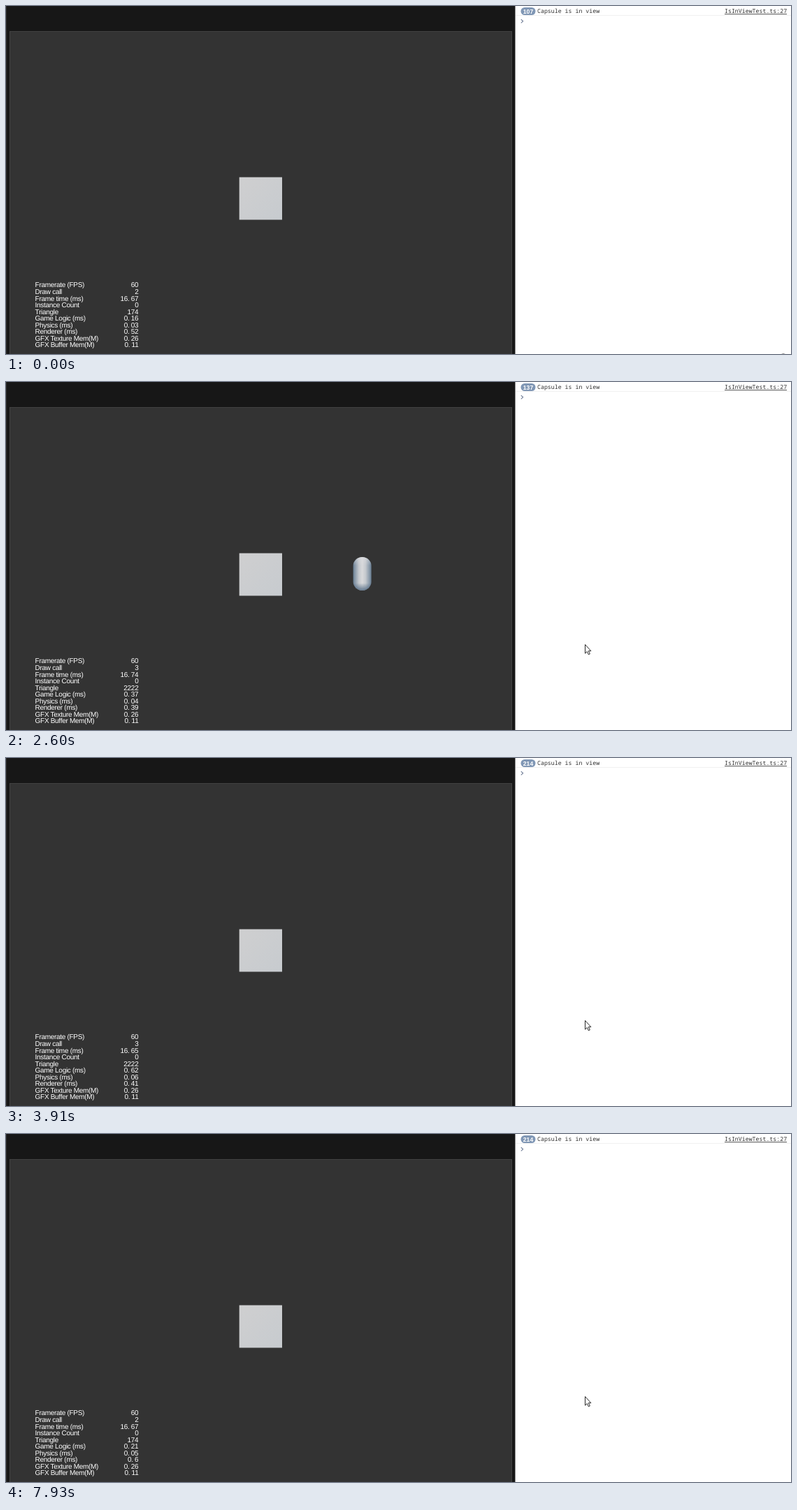
An HTML page that plays this animation: 1123 by 499 pixels, repeating every 8 s.

```html
<!DOCTYPE html>
<html lang="en">
<head>
<meta charset="utf-8">
<title>Capsule in view test</title>
<style>
  html, body { margin: 0; width: 100%; height: 100%; overflow: hidden; background: #fff; }
  svg { display: block; width: 100%; height: 100%; }
  text { white-space: pre; text-rendering: geometricPrecision; }
  .stats { font: 10px "Liberation Sans", Arial, sans-serif; letter-spacing: -.3px; fill: #fff; }
  .log { font: 8.25px "Noto Sans Mono", "DejaVu Sans Mono", monospace; fill: #303030; }
  .badge { font: bold 8.6px "Liberation Sans", Arial, sans-serif; fill: #fff; text-anchor: middle; }
</style>
</head>
<body>
<svg viewBox="0 0 1123 499">
  <defs>
    <linearGradient id="face" x1="0" y1="0" x2="1" y2="1">
      <stop offset="0" stop-color="#cfcfd0"/><stop offset="1" stop-color="#c7cbcf"/>
    </linearGradient>
    <linearGradient id="light">
      <stop offset="0" stop-color="#36536f"/><stop offset=".2" stop-color="#8b9bab"/>
      <stop offset=".36" stop-color="#c5c9ce"/><stop offset=".5" stop-color="#d8d9db"/>
      <stop offset=".64" stop-color="#c5c9ce"/><stop offset=".8" stop-color="#8b9bab"/>
      <stop offset="1" stop-color="#36536f"/>
    </linearGradient>
    <linearGradient id="shade" x1="0" y1="0" x2="0" y2="1">
      <stop offset="0" stop-color="#dcdde0" stop-opacity=".55"/>
      <stop offset=".25" stop-color="#dcdde0" stop-opacity="0"/>
      <stop offset=".78" stop-color="#3f5b78" stop-opacity="0"/>
      <stop offset="1" stop-color="#3f5b78" stop-opacity=".75"/>
    </linearGradient>
    <clipPath id="view"><rect x="5" y="37" width="719" height="462"/></clipPath>
  </defs>

  <rect width="729" height="499" fill="#171717"/>
  <rect width="1" height="499" fill="#2b2b2b"/>
  <rect x="5.5" y="36.5" width="718" height="470" fill="#333" stroke="#424242"/>
  <g clip-path="url(#view)">
    <g id="capsule">
      <rect x="-.5" y="-.5" width="1" height="1" rx=".5" ry=".26" fill="url(#light)"/>
      <rect x="-.5" y="-.5" width="1" height="1" rx=".5" ry=".26" fill="url(#shade)"/>
    </g>
  </g>
  <rect x="333.7" y="245.5" width="61.3" height="61" fill="url(#face)"/>
  <g class="stats" id="stats"></g>

  <rect x="728.5" width="395" height="499" fill="#fff"/>
  <rect x="729" y="13" width="394" height="1" fill="#f0f0f0"/>
  <rect x="736.5" y="2" width="21" height="11" rx="5.5" fill="#8097b5"/>
  <text class="badge" id="count" x="747" y="10.7"></text>
  <text class="log" x="760" y="10.3">Capsule is in view</text>
  <text class="log" x="1028" y="10.3" text-decoration="underline">IsInViewTest.ts:27</text>
  <path d="M736.8 19.2l2.8 2.6l-2.8 2.6" fill="none" stroke="#6d7b94" stroke-width="1.1"/>
  <path id="speck" d="M-3 .9Q0-.9 3 .9" fill="none" stroke="#777"/>
  <path id="cursor" d="M.5.5v12.6l2.8-2.6l2 4.3l2-.9l-2-4.2h3.6z" fill="#fff" stroke="#111" stroke-width=".9"/>
</svg>
<script>
const LOOP = 8000;
const $ = id => document.getElementById(id);
const clamp = (v, lo, hi) => Math.min(hi, Math.max(lo, v));

const labels = ['Framerate (FPS)', 'Draw call', 'Frame time (ms)', 'Instance Count', 'Triangle',
  'Game Logic (ms)', 'Physics (ms)', 'Renderer (ms)', 'GFX Texture Mem(M)', 'GFX Buffer Mem(M)'];

// start ms, frame time, game logic, physics, renderer
const samples = [
  [0, '16.67', '0.16', '0.03', '0.52'],
  [480, '16.67', '0.18', '0.04', '0.45'],
  [970, '16.68', '0.17', '0.03', '0.41'],
  [1440, '16.68', '0.2', '0.04', '0.39'],
  [1970, '16.68', '0.19', '0.03', '0.42'],
  [2450, '16.74', '0.37', '0.04', '0.39'],
  [2910, '16.65', '0.36', '0.03', '0.3'],
  [2980, '16.65', '0.39', '0.03', '0.3'],
  [3910, '16.65', '0.62', '0.06', '0.41'],
  [4440, '16.68', '0.21', '0.04', '0.37'],
  [4900, '16.68', '0.18', '0.03', '0.35'],
  [5450, '16.68', '0.19', '0.04', '0.33'],
  [5910, '16.68', '0.16', '0.04', '0.36'],
  [6370, '16.68', '0.17', '0.03', '0.31'],
  [6920, '16.66', '0.19', '0.04', '0.38'],
  [7380, '16.67', '0.18', '0.03', '0.34'],
  [7930, '16.67', '0.21', '0.05', '0.6']
];

function addText(x, y, content, anchor) {
  const node = document.createElementNS('http://www.w3.org/2000/svg', 'text');
  node.setAttribute('x', x);
  node.setAttribute('y', y);
  node.setAttribute('text-anchor', anchor);
  node.textContent = content;
  $('stats').append(node);
  return node;
}

const values = labels.map((label, i) => {
  const y = 403.4 + i * 9.56;
  addText(41.6, y, label, 'start');
  return addText(189.4, y, '', 'end');
});

function drawStats(t) {
  const [, frame, logic, physics, renderer] = samples.findLast(s => s[0] <= t);
  const visible = t >= 2450 && t < 4440;
  const row = ['60', visible ? '3' : '2', frame, '0', visible ? '2222' : '174',
    logic, physics, renderer, '0.26', '0.11'];
  row.forEach((v, i) => { values[i].textContent = v.replace('.', '. '); });
}

// The capsule circles the camera, so its screen offset follows a tangent.
function drawCapsule(t) {
  const step = Math.floor((t - 2133) / 76.923);
  const shown = step >= 0 && step < 23;
  $('capsule').style.display = shown ? '' : 'none';
  const now = Math.round((2138.5 + step * 76.923) / 10) * 10;
  $('count').textContent = step < 0 ? 107 : clamp(Math.round(137 + (now - 2600) / 16.757), 107, 214);
  if (!shown) return;

  const angle = (3001 - now) * 0.000778;
  const offset = 450 * Math.tan(angle);
  const cos = Math.cos(angle);
  $('capsule').setAttribute('transform',
    `translate(${364.5 + offset} 274.9) scale(${23.6 / cos ** 2} ${45.5 / cos})`);
  const peak = 0.37 + 0.0009 * offset;
  $('light').setAttribute('x1', peak - 0.65);
  $('light').setAttribute('x2', peak + 0.65);
}

function drawCursor(t) {
  $('speck').style.display = t < 290 ? '' : 'none';
  $('speck').setAttribute('transform', `translate(1112 ${498.6 + (t >= 130) * 0.2 + (t >= 210) * 0.2})`);
  $('cursor').style.display = t >= 480 ? '' : 'none';
  const p = clamp(Math.floor((t - 480) / 81.4), 0, 7) / 7;
  const left = (1 - p) ** 2;
  $('cursor').setAttribute('transform', `translate(${828 + 237 * left} ${376 + 108 * left})`);
}

function draw(time) {
  const t = Math.max(0, time) % LOOP;
  drawStats(t);
  drawCapsule(t);
  drawCursor(t);
}

const start = performance.now();
function tick(now) {
  draw(now - start);
  requestAnimationFrame(tick);
}
draw(0);
requestAnimationFrame(tick);
</script>
</body>
</html>
```
